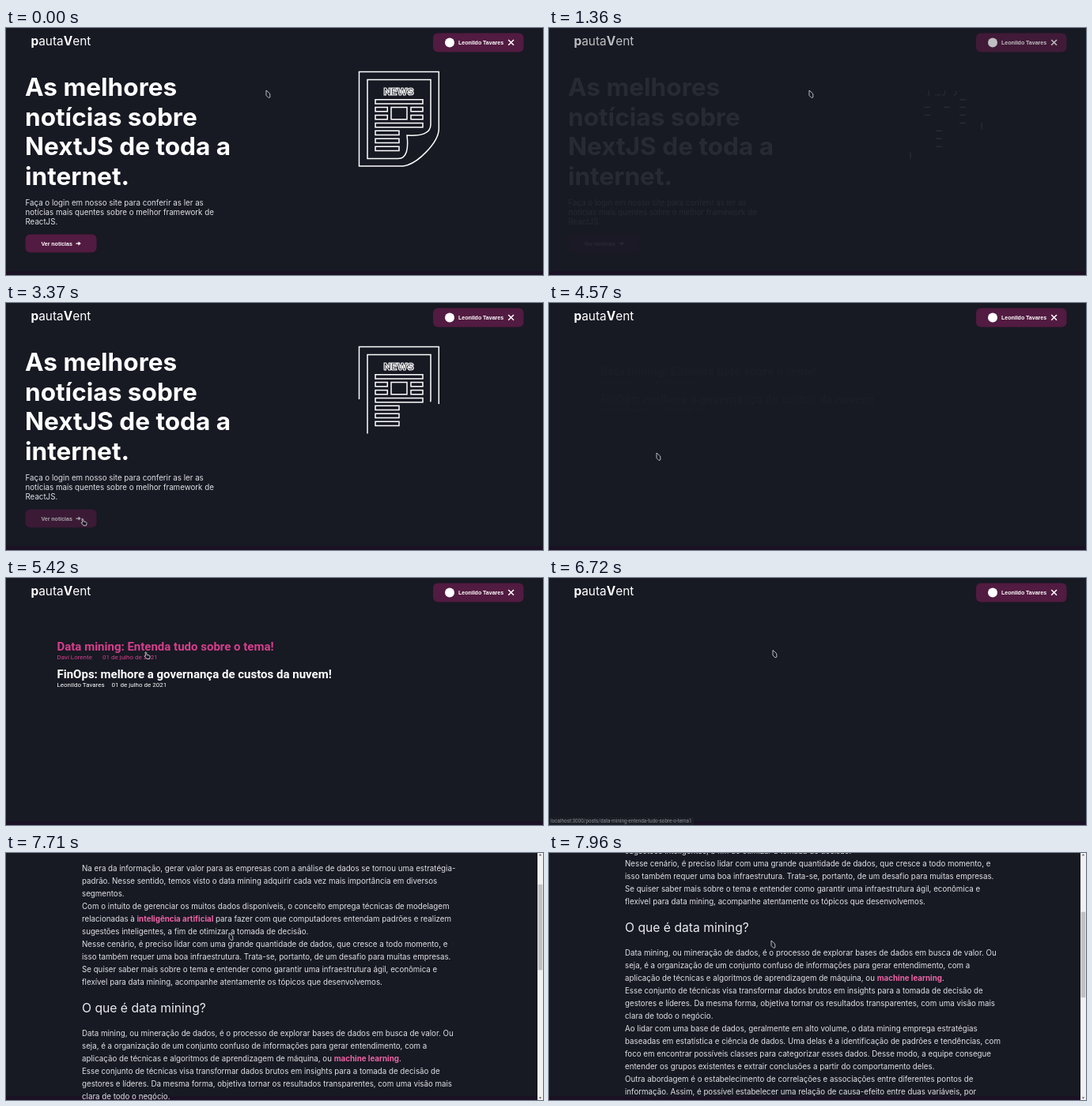
These frames come from a looping animation (679 px wide and 313 px high, 8 s). An HTML page:

```html
<!DOCTYPE html>
<html lang="pt-BR">
<head>
<meta charset="utf-8">
<style>
html, body { margin: 0; width: 100%; height: 100%; overflow: hidden; background: #171923; }
svg { display: block; font: 9.74px Inter, sans-serif; fill: #fff; }
.body { fill: #e2e2e6; }
.h1 { font-size: 31.6px; font-weight: 700; }
.title { font-size: 23.75px; font-weight: 700; }
.h2 { font-size: 15.7px; fill: #ececf0; }
.logo { font-size: 15.4px; }
.btn { font: 700 7px "Liberation Sans", Arial, sans-serif; }
.post { font: 700 15px Roboto, sans-serif; }
.meta { font: 8px Roboto, sans-serif; }
.date { font-size: 7.8px; font-weight: 700; fill: #38a169; }
.status { font: 6.37px Roboto, sans-serif; fill: #8c8e94; }
.news { font-size: 12.4px; font-weight: 800; stroke-width: 1.2; }
.b { font-weight: 700; }
.link { font-weight: 700; fill: #ed64a6; }
.line { fill: none; stroke: #fff; stroke-width: 1.5; }
.pointer { fill: #171923; stroke: #e4e4e4; stroke-width: .8; stroke-linejoin: round; }
</style>
</head>
<body>
<svg width="679" height="313" viewBox="0 0 679 313">
  <rect width="679" height="313" fill="#171923"/>
  <rect y="308.5" width="679" height="4.5" fill="#1b1024"/>

  <g id="home">
    <g id="hero"></g>
    <g id="cta">
      <rect x="24.5" y="261.5" width="90" height="23" rx="6" fill="#521b41"/>
      <text class="btn" x="44.5" y="275.5">Ver notícias</text>
      <path d="M88.5 272.4h3v-1.9l3.2 2.6-3.2 2.6v-1.9h-3z"/>
    </g>
    <g id="icon" class="line">
      <path d="M547.3 128V55.5H446.5V175H502C520 173 547 145 547.3 128"/>
      <path d="M457 165.5V65.5H537V122C537 134 525 137 507 136C509 152 507 165.5 496 165.5Z"/>
      <text class="news" x="477.5" y="85.3">NEWS</text>
    </g>
  </g>

  <g id="list">
    <g id="first">
      <text class="post" x="64.5" y="92.3">Data mining: Entenda tudo sobre o tema!</text>
      <text class="meta" x="64.5" y="103">Davi Lorente</text>
      <text class="meta" x="122" y="103">01 de julho de 2021</text>
    </g>
    <text class="post" x="64.5" y="126.7">FinOps: melhore a governança de custos da nuvem!</text>
    <text class="meta" x="64.5" y="137.5">Leonildo Tavares</text>
    <text class="meta" x="133.5" y="137.5">01 de julho de 2021</text>
  </g>

  <g id="article">
    <text class="title" x="96" y="78">Data mining: Entenda tudo sobre o tema!</text>
    <text class="date" x="96" y="91.5">01 de julho de 2021</text>
    <text class="h2" x="96" y="303">O que é data mining?</text>
  </g>

  <g id="header">
    <text class="logo" x="31.5" y="21.5"><tspan class="b">p</tspan>auta<tspan class="b">V</tspan>ent</text>
    <rect x="540" y="6.5" width="114.5" height="24" rx="6" fill="#521b41"/>
    <circle cx="561" cy="18.5" r="6"/>
    <text class="btn" x="572" y="21">Leonildo Tavares</text>
    <path class="line" d="M635.2 15l6.8 6.8m0-6.8l-6.8 6.8"/>
  </g>

  <g id="status">
    <rect y="303" width="183" height="10" fill="#1c1e27"/>
    <text class="status" x="2" y="310.3">localhost:3000/posts/data-mining-entenda-tudo-sobre-o-tema1</text>
  </g>

  <g id="scrollbar">
    <rect x="672" width="7" height="313" fill="#f1f1f1"/>
    <rect id="thumb" x="672.7" y="5" width="5.6" height="108.5" fill="#c1c1c1"/>
    <path d="M673.8 3.2l1.7-1.9 1.7 1.9zM673.8 309.6l1.7 1.9 1.7-1.9z" fill="#505050"/>
  </g>

  <g id="cursor" class="pointer">
    <path id="arrow" d="M0 0V6.5L3 9.5 5 8.5 4.6 4Z"/>
    <path id="hand" d="M1 .5Q2 -.2 2.6 1L3.2 4 6 4.4Q7.4 5 7 7L6.4 9H3L.2 5.6 1.6 5.2Z"/>
  </g>
</svg>
<script>
const el = Object.fromEntries([...document.querySelectorAll('[id]')].map(e => [e.id, e]));

const lines = (cls, x, y, step, rows) => rows.map((row, i) =>
  `<text class="${cls}" x="${x}" y="${y + i * step}">${row}</text>`).join('');
const link = text => `<tspan class="link">${text}</tspan>`;

el.hero.innerHTML =
  lines('h1', 24, 86, 37.5, ['As melhores', 'notícias sobre', 'NextJS de toda a', 'internet.']) +
  lines('body', 24.5, 225, 12, [
    'Faça o login em nosso site para conferir as ler as',
    'notícias mais quentes sobre o melhor framework de',
    'ReactJS.']);

el.article.innerHTML += lines('body', 96, 124.3, 16, [
  'Na era da informação, gerar valor para as empresas com a análise de dados se tornou uma estratégia-',
  'padrão. Nesse sentido, temos visto o data mining adquirir cada vez mais importância em diversos',
  'segmentos.',
  'Com o intuito de gerenciar os muitos dados disponíveis, o conceito emprega técnicas de modelagem',
  `relacionadas à ${link('inteligência artificial')} para fazer com que computadores entendam padrões e realizem`,
  'sugestões inteligentes, a fim de otimizar a tomada de decisão.',
  'Nesse cenário, é preciso lidar com uma grande quantidade de dados, que cresce a todo momento, e',
  'isso também requer uma boa infraestrutura. Trata-se, portanto, de um desafio para muitas empresas.',
  'Se quiser saber mais sobre o tema e entender como garantir uma infraestrutura ágil, econômica e',
  'flexível para data mining, acompanhe atentamente os tópicos que desenvolvemos.'
]) + lines('body', 96, 333, 16, [
  'Data mining, ou mineração de dados, é o processo de explorar bases de dados em busca de valor. Ou',
  'seja, é a organização de um conjunto confuso de informações para gerar entendimento, com a',
  `aplicação de técnicas e algoritmos de aprendizagem de máquina, ou ${link('machine learning')}.`,
  'Esse conjunto de técnicas visa transformar dados brutos em insights para a tomada de decisão de',
  'gestores e líderes. Da mesma forma, objetiva tornar os resultados transparentes, com uma visão mais',
  'clara de todo o negócio.',
  'Ao lidar com uma base de dados, geralmente em alto volume, o data mining emprega estratégias',
  'baseadas em estatística e ciência de dados. Uma delas é a identificação de padrões e tendências, com',
  'foco em encontrar possíveis classes para categorizar esses dados. Desse modo, a equipe consegue',
  'entender os grupos existentes e extrair conclusões a partir do comportamento deles.',
  'Outra abordagem é o estabelecimento de correlações e associações entre diferentes pontos de',
  'informação. Assim, é possível estabelecer uma relação de causa-efeito entre duas variáveis, por']);

// Newspaper boxes, each outlined from its top right corner
const box = (right, y, w, h = 5.3) => `<path d="M${right} ${y}h${-w}v${h}h${w}z"/>`;
el.icon.innerHTML += [90.7, 120.5].map(y => box(527, y, 60)).join('') +
  [100.4, 110.4].map(y => box(482.3, y, 15.3) + box(527, y, 15)).join('') +
  [130.3, 140.3, 150.3].map(y => box(497, y, 30)).join('') +
  box(507, 100.4, 20, 15.3);

// The screen refreshes only at these moments
const run = (from, to, n) => Array.from({ length: n }, (_, i) => from + (to - from) * i / (n - 1));
const ticks = [0, ...run(20, 940, 17), ...run(1080, 1360, 4), ...run(2060, 3090, 9),
  ...run(3220, 4110, 7), 4370, 4570, 4870, 5140, 5420, 5740, 6470, 6720, 6990, 7220, 7460, 7710, 7960];

// Linear interpolation over [time, value] pairs
function key(t, ...pairs) {
  const i = pairs.findIndex(p => p[0] > t);
  if (i < 0) return pairs.at(-1)[1];
  if (i === 0) return pairs[0][1];
  const [t0, a] = pairs[i - 1], [t1, b] = pairs[i];
  return a + (b - a) * (t - t0) / (t1 - t0);
}

const path = [[0, 329, 79], [2700, 329, 79], [3220, 95, 273], [4110, 95, 273], [4570, 136, 190],
  [4870, 136, 190], [5420, 175, 93.5], [6470, 175, 93.5], [6720, 283, 91.5], [7460, 283, 91.5], [7960, 281, 111]];
const along = (t, axis) => key(t, ...path.map(p => [p[0], p[axis]]));
const show = (e, on) => e.style.display = on ? '' : 'none';
const fade = (e, opacity) => { show(e, opacity > 0); e.style.opacity = opacity; };

function draw(now) {
  const t = ticks.findLast(tick => tick <= now % 8000);
  const scroll = key(t, [7460, 0], [7960, 203]);
  const reading = t >= 6990;
  const onButton = t >= 3220 && t < 4370;
  const onPost = t >= 5420 && t < 5740;

  fade(el.header, key(t, [0, 1], [940, 0], [1080, .1], [1360, .72], [2059, .72], [2450, 1]));
  fade(el.home, key(t, [0, 1], [940, 0], [1080, 0], [1360, .07], [2059, .07], [3090, 1], [4110, 1], [4570, 0]));
  fade(el.list, key(t, [4370, 0], [4570, .01], [4870, .4], [5420, 1], [5739, 1], [5740, .05], [6470, .03], [6720, 0]));
  fade(el.article, key(t, [6720, 0], [6990, .25], [7220, .68], [7460, 1]));

  const drawn = key(t, [1079, 999], [1080, 1], [1360, 8], [2060, 8], [3370, 240], [4110, 371]);
  el.icon.setAttribute('stroke-dasharray', drawn > 900 ? 'none' : `${drawn} 999`);
  el.cta.style.opacity = onButton ? .62 : 1;
  el.first.setAttribute('fill', t >= 5420 ? '#d53f8c' : '#fff');

  el.header.setAttribute('transform', `translate(${reading ? -3.5 : 0} ${-scroll})`);
  el.article.setAttribute('transform', `translate(0 ${-scroll})`);
  el.thumb.setAttribute('y', 5 + scroll * .343);
  show(el.scrollbar, reading);
  show(el.status, t >= 5740 && t < 7710);

  el.cursor.setAttribute('transform', `translate(${along(t, 1)} ${along(t, 2)})`);
  show(el.hand, onButton || onPost);
  show(el.arrow, !onButton && !onPost);
}

const start = performance.now();
function loop() {
  draw(performance.now() - start);
  requestAnimationFrame(loop);
}
loop();
</script>
</body>
</html>
```
